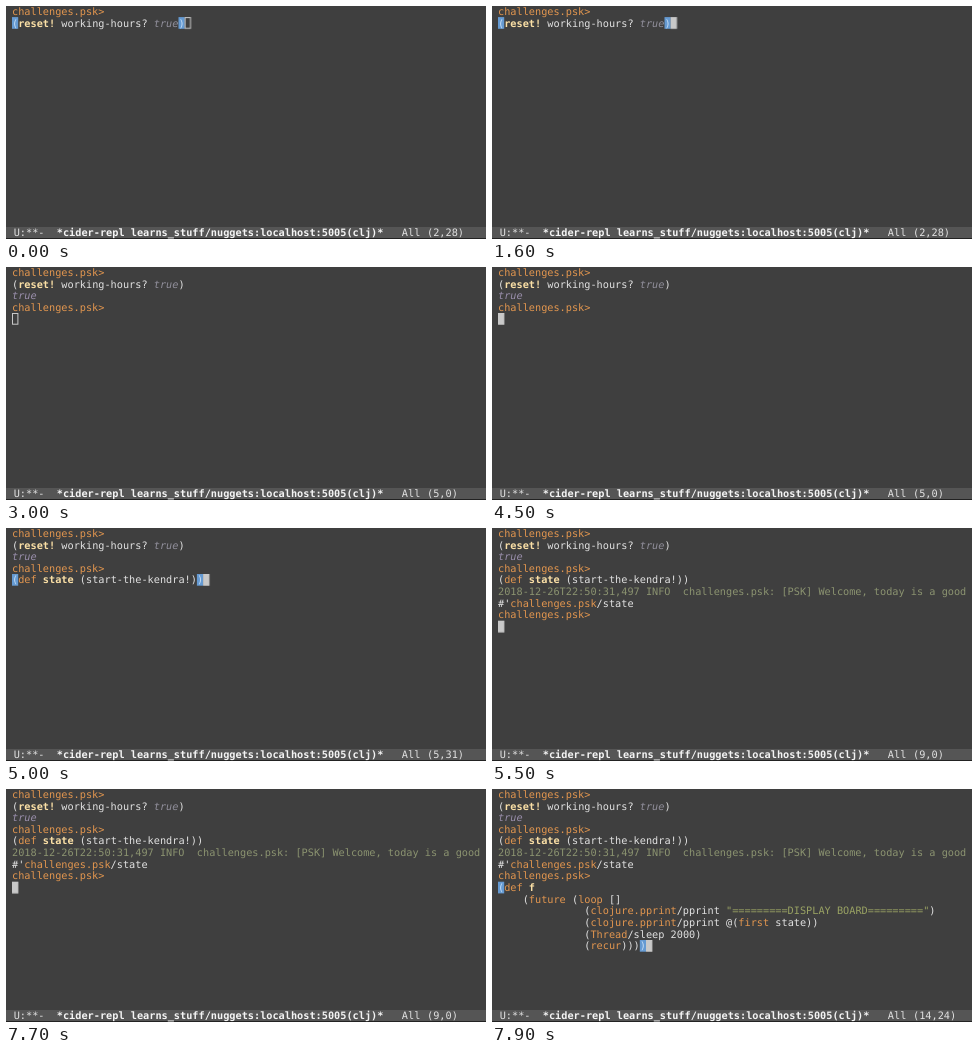
An HTML page for the animation above (8 s loop, 480 by 233 pixels).

```html
<!DOCTYPE html>
<html lang="en">
<head>
<meta charset="utf-8">
<title>REPL session</title>
<style>
html, body { margin: 0; width: 100%; height: 100%; overflow: hidden; background: #3f3f3f; }
svg { display: block; width: 480px; height: 233px; }
text {
  font: 10.24px "DejaVu Sans Mono", "Liberation Mono", monospace;
  white-space: pre;
  text-rendering: geometricPrecision;
  fill: #e2e2e2;
}
.o { fill: #e2964f; }
.b { fill: #fbe0a6; font-weight: bold; }
.i { fill: #92909c; font-style: italic; }
.out { fill: #9a8fac; font-style: italic; }
.log { fill: #8b9370; }
.str { fill: #99a263; }
.name { font-weight: bold; fill: #f4f4f4; }
.paren rect { fill: #659ad2; }
.paren text { fill: #c4dcf4; }

/* Blocks that appear and stay until the loop restarts */
.result { animation: result 8s step-end infinite; }
.state  { animation: state 8s step-end infinite; }
.log-in { animation: log-in 8s step-end infinite; }
.board  { animation: board 8s step-end infinite; }
@keyframes result { 0% { visibility: hidden } 21.25%, 100% { visibility: visible } }
@keyframes state  { 0% { visibility: hidden } 60%, 100% { visibility: visible } }
@keyframes log-in { 0% { visibility: hidden } 66.25%, 100% { visibility: visible } }
@keyframes board  { 0% { visibility: hidden } 97.5%, 100% { visibility: visible } }

/* Things shown only while the point is at one place */
.at1 { animation: at1 8s step-end infinite; }
.at2 { animation: at2 8s step-end infinite; }
.at3 { animation: at3 8s step-end infinite; }
.at4 { animation: at4 8s step-end infinite; }
@keyframes at1 { 0% { visibility: visible } 21.25%, 100% { visibility: hidden } }
@keyframes at2 { 0% { visibility: hidden } 21.25% { visibility: visible } 60%, 100% { visibility: hidden } }
@keyframes at3 { 0% { visibility: hidden } 60% { visibility: visible } 66.25%, 100% { visibility: hidden } }
@keyframes at4 { 0% { visibility: hidden } 66.25% { visibility: visible } 97.5%, 100% { visibility: hidden } }

#cursor { animation: move 8s step-end infinite; }
#cursor rect { stroke: #c9c9c9; animation: blink 8s step-end infinite; }
@keyframes move {
  0%         { transform: translate(178.6px, 11.1px) }
  21.25%     { transform: translate(6px, 46px) }
  60%        { transform: translate(197.1px, 46px) }
  66.25%     { transform: translate(6px, 92.7px) }
  97.5%, 100% { transform: translate(154px, 151px) }
}
@keyframes blink {
  0%     { fill: transparent }
  5%     { fill: #c9c9c9 }
  11.25% { fill: transparent }
  17.5%  { fill: #c9c9c9 }
  27.5%  { fill: transparent }
  56.25% { fill: #c9c9c9 }
  73.75% { fill: transparent }
  93.75%, 100% { fill: #c9c9c9 }
}
</style>
</head>
<body>
<svg viewBox="0 0 480 233">
  <rect width="480" height="233" fill="#3f3f3f"/>

  <text x="6" y="8.8" class="o">challenges.psk&gt;</text>
  <text x="6" y="20.5">(<tspan class="b">reset!</tspan> working-hours? <tspan class="i">true</tspan>)</text>

  <g class="result">
    <text x="6" y="32.1" class="out">true</text>
    <text x="6" y="43.8" class="o">challenges.psk&gt;</text>
  </g>

  <g class="state">
    <text x="6" y="55.4">(<tspan class="o">def</tspan> <tspan class="b">state</tspan> (start-the-kendra!))</text>
  </g>

  <g class="log-in">
    <text x="6" y="67.1" class="log">2018-12-26T22:50:31,497 INFO  challenges.psk: [PSK] Welcome, today is a good</text>
    <text x="6" y="78.8">#'<tspan class="o">challenges.psk</tspan>/state</text>
    <text x="6" y="90.4" class="o">challenges.psk&gt;</text>
  </g>

  <g class="board">
    <text x="6" y="102.1">(<tspan class="o">def</tspan> <tspan class="b">f</tspan></text>
    <text x="6" y="113.7">    (<tspan class="o">future</tspan> (<tspan class="o">loop</tspan> []</text>
    <text x="6" y="125.4">              (<tspan class="o">clojure.pprint</tspan>/pprint <tspan class="str">"=========DISPLAY BOARD========="</tspan>)</text>
    <text x="6" y="137.1">              (<tspan class="o">clojure.pprint</tspan>/pprint @(<tspan class="o">first</tspan> state))</text>
    <text x="6" y="148.7">              (<tspan class="o">Thread</tspan>/sleep 2000)</text>
    <text x="6" y="160.4">              (<tspan class="o">recur</tspan>))))</text>
  </g>

  <!-- Matching parentheses -->
  <g class="paren at1">
    <rect x="6" y="11.1" width="6.2" height="11.7"/><text x="6" y="20.5">(</text>
    <rect x="172.5" y="11.1" width="6.2" height="11.7"/><text x="172.5" y="20.5">)</text>
  </g>
  <g class="paren at3">
    <rect x="6" y="46" width="6.2" height="11.7"/><text x="6" y="55.4">(</text>
    <rect x="190.9" y="46" width="6.2" height="11.7"/><text x="190.9" y="55.4">)</text>
  </g>
  <g class="paren board">
    <rect x="6" y="92.7" width="6.2" height="11.7"/><text x="6" y="102.1">(</text>
    <rect x="147.8" y="151" width="6.2" height="11.7"/><text x="147.8" y="160.4">)</text>
  </g>

  <g id="cursor"><rect x=".5" y=".5" width="5.4" height="10.7"/></g>

  <!-- Mode line with a dark edge below -->
  <rect y="221" width="480" height="11" fill="#555"/>
  <rect y="232" width="480" height="1" fill="#222"/>
  <text x="1.5" y="230.3"> U:**-  <tspan class="name">*cider-repl learns_stuff/nuggets:localhost:5005(clj)*</tspan>   All</text>
  <text x="421" y="230.3" class="at1">(2,28)</text>
  <text x="421" y="230.3" class="at2">(5,0)</text>
  <text x="421" y="230.3" class="at3">(5,31)</text>
  <text x="421" y="230.3" class="at4">(9,0)</text>
  <text x="421" y="230.3" class="board">(14,24)</text>
</svg>
</body>
</html>
```
